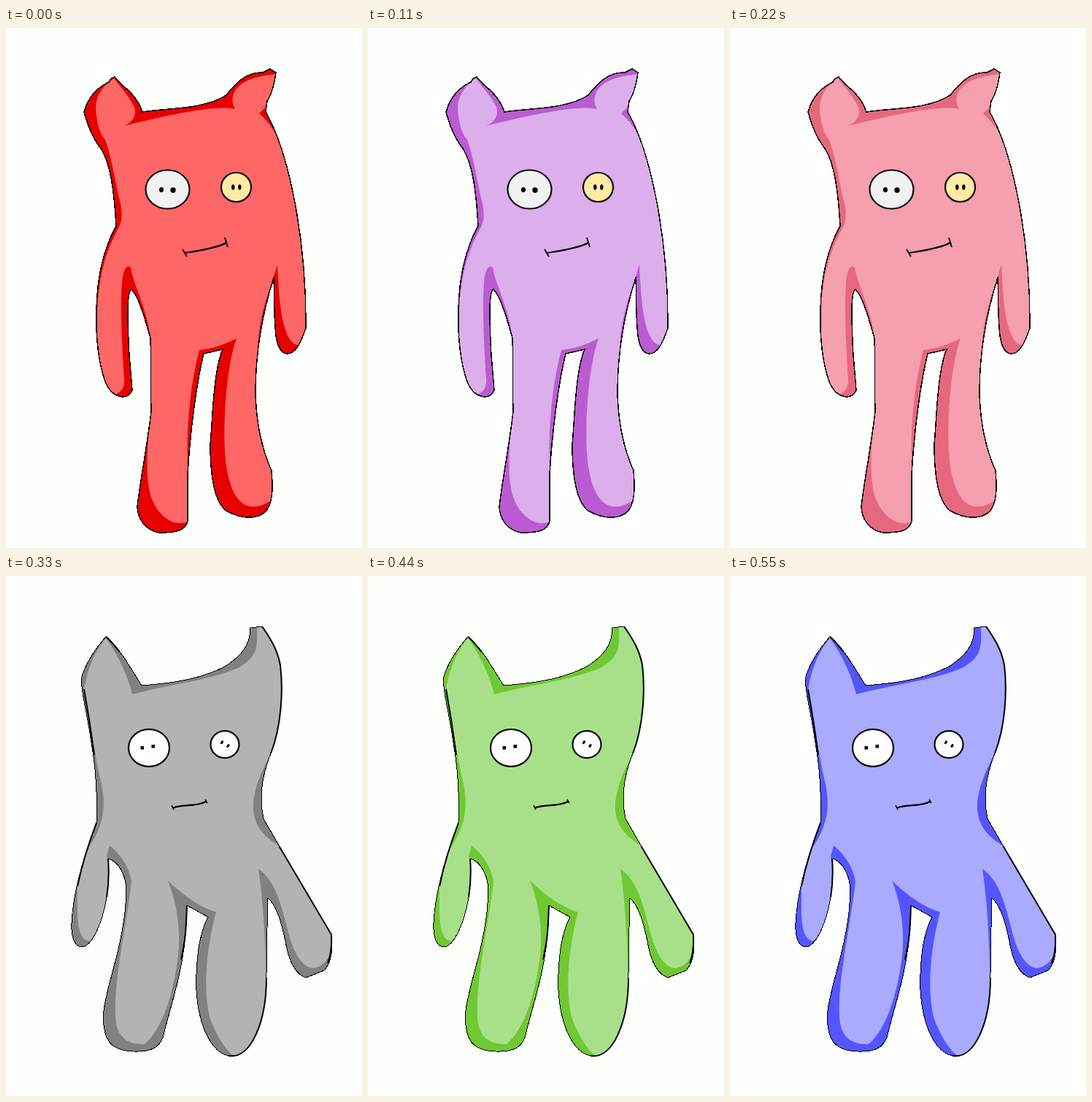
Recreate the animation shown at these times as an HTML page. Size 488 px wide and 712 px high, loop 0.66 s.

```html
<!DOCTYPE html>
<html lang="en">
<head>
<meta charset="utf-8">
<title>Colour-changing creatures</title>
<style>
  html, body { margin: 0; width: 100%; height: 100%; overflow: hidden; background: #fdfffd; }
  svg { display: block; width: 100vw; height: 100vh; }
  .light, .dark, .tall, .wide { animation: .66s step-end infinite; }
  .light { animation-name: light; }
  .dark { animation-name: dark; }
  .tall { animation-name: tall; }
  .wide { animation-name: wide; }
  .line { fill: none; stroke: #000; }
  .edge { shape-rendering: crispEdges; stroke-linejoin: round; }
  .bold { stroke-width: 2; }
  .eye { stroke: #0a0a0a; stroke-width: 2.2; }
  @keyframes light {
    0% { fill: #ff6666; }
    16.6667% { fill: #dcaeeb; }
    33.3333% { fill: #f59faf; }
    50% { fill: #b2b4b2; }
    66.6667% { fill: #a8e08a; }
    83.3333%, 100% { fill: #aaaaff; }
  }
  @keyframes dark {
    0% { fill: #e60000; }
    16.6667% { fill: #b95cd1; }
    33.3333% { fill: #e6687f; }
    50% { fill: #80827f; }
    66.6667% { fill: #70c832; }
    83.3333%, 100% { fill: #5555ff; }
  }
  @keyframes tall {
    0% { visibility: visible; }
    50%, 100% { visibility: hidden; }
  }
  @keyframes wide {
    0% { visibility: hidden; }
    50%, 100% { visibility: visible; }
  }
</style>
</head>
<body>
<svg viewBox="0 0 488 712">
  <defs>
    <path id="tallBody" d="M107,115 C111,100 120,84 141,74 Q144,68 149,67 Q153,72 159,78 C172,88 182,100 187,115
      C225,109 270,112 302,92 C315,75 330,60 352,61 L362,56 L370,61 C368,75 365,90 358,100 L356,115
      C388,170 412,290 411,411 C405,428 398,446 386,446 C375,446 370,430 369,410 C367,385 368,365 367,342
      C350,395 342,450 342,500 C343,540 350,575 364,606 C366,630 366,650 356,662 C345,672 325,674 302,661
      C287,650 280,620 280,570 C283,540 284,470 297,440 L271,446 C260,490 252,560 249,610 L249,675
      C246,688 235,691 210,691 C190,688 180,670 180,655 C184,620 194,570 199,525 C198,490 199,450 198,425
      C190,395 180,365 172,358 C165,362 167,400 168,430 C169,455 172,480 173,496 Q169,505 160,505
      C145,504 137,490 133,475 C126,450 123,420 124,385 C125,340 135,300 151,271
      C148,220 143,185 130,165 C118,150 111,130 107,115Z"/>
    <path id="wideBody" d="M137,83 C124,98 109,118 103,141 C104,165 112,190 118,235 C124,270 125,310 124,338
      C108,380 92,430 90,475 C89,495 94,508 105,508 C120,505 133,470 138,440 C142,415 141,400 140,387
      C152,390 163,405 165,428 C164,500 140,550 134,595 C131,635 143,650 175,651 C200,652 210,645 215,632
      C225,590 240,550 245,500 C248,480 247,470 248,451 L277,467 C264,490 260,530 261,567
      C264,618 282,652 305,657 C336,662 357,610 357,550 C357,520 358,480 359,441
      C370,450 378,475 383,500 C388,530 397,545 411,550 L436,540 C446,530 448,510 446,491 L374.5,370
      C365,352 358,342 353,332 C346,300 352,270 363,243 C378,205 380,155 376,122 C372,100 362,85 351,69
      L335,71 C335,95 322,110 300,124 C265,142 225,147 186,150 C170,125 157,100 137,83Z"/>
    <clipPath id="tallClip"><use href="#tallBody"/></clipPath>
    <clipPath id="wideClip"><use href="#wideBody"/></clipPath>
  </defs>

  <g class="tall">
    <use class="dark" href="#tallBody"/>
    <path class="light" clip-path="url(#tallClip)" d="M148,69 C128,82 120,100 124,120 C126,140 133,150 136,153
      C146,180 150,215 157,240 C161,265 157,268 151,280 C135,310 127,345 125,385 L118,400 L124,480 L140,500
      L150,502 C160,497 163,490 162,480 C160,450 156,380 159,350 C160,330 166,323 171,328
      C174,350 194,385 198,425 L199,525 C193,570 190,620 200,645 C210,670 230,682 247,677 L252,675 L249,597
      C247,550 252,490 265,441 C285,439 300,433 316,425 C300,470 296,560 302,600 C308,640 325,670 362,648
      L372,630 L364,600 L350,500 L345,440 C347,390 360,365 372,324 C374,360 375,400 388,425
      C393,432 397,434 401,434 L418,411 L418,300 L378,160 C370,145 362,130 347,117 L356,108 L360,100 L372,63
      C350,65 320,70 312,90 C309,100 311,105 314,111 C300,108 270,107 162,134
      C172,130 180,120 176,108 C168,92 152,75 148,69Z"/>
    <use class="line edge" stroke-width="1.5" href="#tallBody"/>
    <ellipse class="eye" cx="221.5" cy="221" rx="30" ry="26.5" fill="#f0f1f0"/>
    <ellipse class="eye" cx="315.5" cy="218" rx="20.5" ry="20" fill="#ffeba3"/>
    <ellipse cx="213" cy="221.5" rx="3" ry="3.5"/>
    <ellipse cx="229" cy="222" rx="3.7" ry="3.7"/>
    <ellipse cx="311.3" cy="218" rx="2.2" ry="3.8"/>
    <ellipse cx="320.3" cy="218" rx="2.2" ry="3.8"/>
    <path class="line" stroke-width="2.2" d="M245,308 C265,305 290,301 302,294"/>
    <path class="line" stroke-width="1.8" d="M242,303 L248,313 M300,287 L304,300"/>
  </g>

  <g class="wide">
    <use class="dark" href="#wideBody"/>
    <path class="light" clip-path="url(#wideClip)" d="M137,85 C122,103 112,125 107,155 C115,195 122,250 131,285
      C138,320 132,345 111,375 L92,425 L98,425 C98,460 95,495 113,500 L128,490 L146,420 L138,384
      L142,369 C155,380 168,395 172,418 C165,480 148,550 150,600 C150,630 165,642 190,641
      C215,620 230,570 236,520 C240,480 233,445 222,417 C245,440 270,455 288,460
      C272,520 270,580 282,612 C292,635 302,650 312,657 L345,660 L366,600 L356,550
      C356,500 352,440 346,401 C366,415 375,440 385,480 C393,515 405,535 420,537 C435,535 442,525 445,515
      L453,492 L375,370 C333,345 326,312 363,243 L384,200 L384,110 L351,66 L344,71
      C345,100 344,110 320,125 C280,143 230,147 173,162 C168,140 155,110 137,85Z"/>
    <use class="line edge" stroke-width="1" href="#wideBody"/>
    <path class="line bold" d="M107,155 C112,183 117,215 121,245 M124,338 Q106,385 98,425
      M351,69 C362,85 372,100 376,122 C380,155 378,205 363,243 M374.5,370 L446,491 Q447,515 441,530
      M140,387 C141,400 142,415 138,440 M248,451 C247,475 247,495 240,525
      M357,550 C357,610 336,662 305,657 M137,83 C144,89 150,97 156,104"/>
    <ellipse class="eye" cx="196" cy="235.3" rx="28" ry="25.5" fill="#fdfffd"/>
    <ellipse class="eye" cx="300" cy="230.7" rx="19.5" ry="18.5" fill="#fdfffd"/>
    <path d="M184.5,233 h4.5 v4.5 h-4.5z M199.5,231 h4.5 v4.5 h-4.5z"/>
    <path class="line" stroke-width="3" d="M294.7,229.8 L297.3,225.8 M303.2,234.4 L305.8,230.6"/>
    <path class="line" stroke-width="2.4" d="M229,317.5 C243,311.5 257,317 274,309"/>
    <path class="line" stroke-width="1.5" d="M227,314 L230,320 M273,306 L276,311"/>
  </g>
</svg>
</body>
</html>
```
